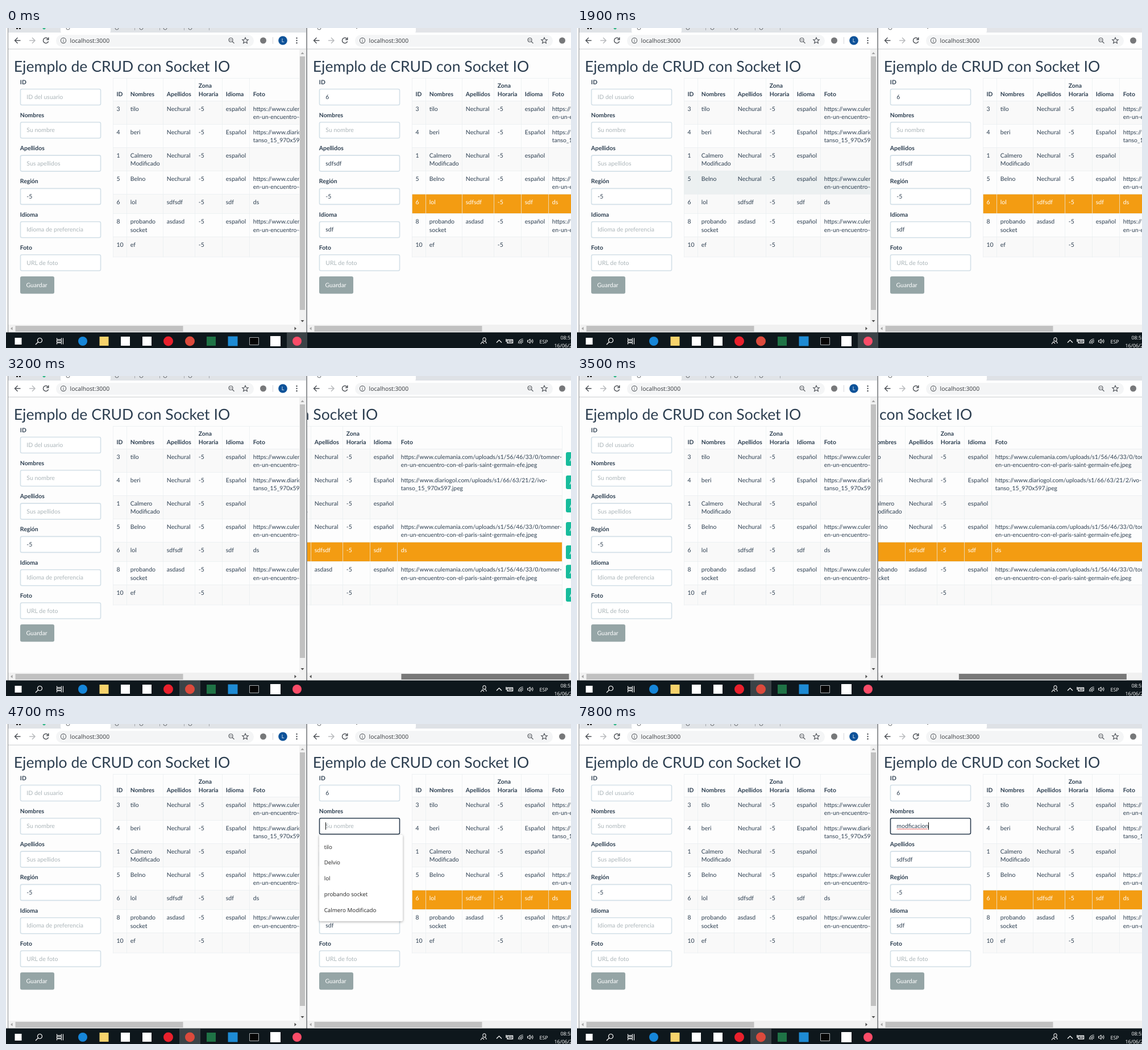
An HTML page with a canvas for the animation above (8 s loop, 994x563 px).

```html
<!DOCTYPE html>
<html lang="es">
<head>
<meta charset="utf-8">
<title>Ejemplo de CRUD con Socket IO</title>
<style>
html, body { margin: 0; width: 100%; height: 100%; overflow: hidden; background: #fdfdfd; }
canvas { display: block; }
</style>
</head>
<body>
<canvas id="stage" width="994" height="563"></canvas>
<script>
const ctx = document.getElementById('stage').getContext('2d');
const LOOP = 8000, STEP = 100, PANE_SHIFT = 526;
const INK = '#2c3e50', PAGE = '#fdfdfd', LINE = '#e9eef0';
const LATO = 'Lato, sans-serif', UI = '"Open Sans", sans-serif';
const BODY = `10.5px ${LATO}`, BOLD = `bold 10.4px ${LATO}`, TITLE = `26.6px ${LATO}`;

const longUrl = ['https://www.culemania.com/uploads/s1/56/46/33/0/tomner-', 'en-un-encuentro-con-el-paris-saint-germain-efe.jpeg'];
const otherUrl = ['https://www.diariogol.com/uploads/s1/66/63/21/2/ivo-', 'tanso_15_970x597.jpeg'];
const columns = [188, 212.3, 276.3, 332.3, 380.3, 428.3, 718.3];
const headers = ['ID', 'Nombres', 'Apellidos', 'Zona|Horaria', 'Idioma', 'Foto'];
const rowTops = [128, 169, 210, 251, 292, 326.3, 367, 402.5];
const rows = [
  ['3', 'tilo', 'Nechural', '-5', 'español', longUrl],
  ['4', 'beri', 'Nechural', '-5', 'Español', otherUrl],
  ['1', 'Calmero|Modificado', 'Nechural', '-5', 'español', ''],
  ['5', 'Belno', 'Nechural', '-5', 'español', longUrl],
  ['6', 'lol', 'sdfsdf', '-5', 'sdf', 'ds'],
  ['8', 'probando|socket', 'asdasd', '-5', 'español', longUrl],
  ['10', 'ef', '', '-5', '', '']
];
const SELECTED = 4;
const fields = [
  ['ID', 'ID del usuario'], ['Nombres', 'Su nombre'], ['Apellidos', 'Sus apellidos'],
  ['Región', ''], ['Idioma', 'Idioma de preferencia'], ['Foto', 'URL de foto']
];
const suggestions = ['tilo', 'Delvio', 'lol', 'probando socket', 'Calmero Modificado'];

// [time, value] lists: the last entry already reached is in force
const at = (track, t) => track.reduce((value, [time, next]) => t >= time ? next : value, track[0][1]);
const leftHover = [[0, -1], [600, 5], [700, 1], [800, -1], [1900, 3], [2000, -1]];
const rightHover = [[0, -1], [4200, 5], [4300, -1]];
const scrollTrack = [[0, 0], [2700, 16], [2800, 62], [2900, 115], [3000, 170], [3100, 222],
  [3200, 266], [3300, 296], [3500, 225], [3600, 125], [3700, 40], [3800, 0]];
const thumbTrack = [[0, '#c1c1c1'], [2300, '#a8a8a8'], [2700, '#787878'], [4000, '#c1c1c1']];
const borderTrack = [[0, '#d3e0e8'], [2700, '#8f9dab'], [2800, '#56657a'], [2900, INK]];
const caretTrack = [[0, false], [2700, true], [3200, false], [3700, true], [4200, false], [4700, true],
  [5200, false], [5500, true], [7300, false], [7800, true]];
const typedTrack = [[0, 0], [5500, 1], [5700, 3], [5900, 5], [6100, 6], [6200, 7], [6300, 8],
  [6500, 9], [6700, 10], [6800, 11]];

function rect(x, y, w, h, color) {
  ctx.fillStyle = color;
  ctx.fillRect(x, y, w, h);
}
function rounded(x, y, w, h, r, fill, stroke, width = 1) {
  ctx.beginPath();
  ctx.roundRect(x, y, w, h, r);
  if (fill) { ctx.fillStyle = fill; ctx.fill(); }
  if (stroke) { ctx.strokeStyle = stroke; ctx.lineWidth = width; ctx.stroke(); }
}
function disc(x, y, r, color) {
  ctx.beginPath();
  ctx.arc(x, y, r, 0, 7);
  ctx.fillStyle = color;
  ctx.fill();
}
function path(d, x, y, color, width = 1.3) {
  ctx.save();
  ctx.translate(x, y);
  ctx.strokeStyle = color;
  ctx.lineWidth = width;
  ctx.stroke(new Path2D(d));
  ctx.restore();
}
function triangle(x, y, dx, dy, color) {
  ctx.beginPath();
  ctx.moveTo(x + dx * 2, y + dy * 2);
  ctx.lineTo(x - dx * 1.5 + dy * 3, y - dy * 1.5 + dx * 3);
  ctx.lineTo(x - dx * 1.5 - dy * 3, y - dy * 1.5 - dx * 3);
  ctx.fillStyle = color;
  ctx.fill();
}
function text(value, x, y, color = INK, font = BODY) {
  ctx.font = font;
  ctx.fillStyle = color;
  ctx.fillText(value, x, y);
}
function clipped(x, y, w, h, draw) {
  ctx.save();
  ctx.beginPath();
  ctx.rect(x, y, w, h);
  ctx.clip();
  draw();
  ctx.restore();
}

function drawTable(selected, hovered) {
  const [left, right] = [columns[0], columns.at(-1)];
  const bottom = rowTops.at(-1), hairline = 0.73, pad = 6.5;
  rows.forEach((row, i) => {
    const top = rowTops[i], active = i === selected;
    const fill = active ? '#f39c12' : i === hovered ? '#ecf0f1' : i % 2 ? PAGE : '#f9f9f9';
    rect(left, top, right - left, rowTops[i + 1] - top, fill);
  });
  for (const y of [88, ...rowTops]) rect(left, y, right - left, hairline, LINE);
  for (const x of columns) rect(x, 88, hairline, bottom - 87, LINE);
  headers.forEach((header, c) => {
    const lines = header.split('|');
    lines.forEach((line, n) => text(line, columns[c] + pad, 119.5 - 14.7 * (lines.length - 1 - n), INK, BOLD));
  });
  rows.forEach((row, i) => {
    row.forEach((cell, c) => {
      const isUrl = Array.isArray(cell);
      const lines = isUrl ? cell : cell.split('|');
      lines.forEach((line, n) => text(line, columns[c] + pad, rowTops[i] + 17.5 + n * 14.7,
        i === selected ? '#fff' : INK, isUrl ? `10.35px ${LATO}` : BODY));
    });
    rounded(725, rowTops[i] + 6, 64, 24, 3, '#18bc9c');
    text('Actualizar', 731.5, rowTops[i] + 21.5, '#fff');
  });
}

function drawForm(values, focusBorder) {
  fields.forEach(([label, placeholder], i) => {
    const y = 58.3 * i;
    text(label, 24.8, 98.5 + y, INK, BOLD);
    rounded(25.5, 107.5 + y, 141, 28, 2.5, '#fff', i === 1 ? focusBorder : borderTrack[0][1], 1.6);
    const value = values[i];
    text(value || placeholder, 36.3, 125 + y, value ? INK : '#acb6ba');
  });
  rounded(25, 437, 60, 30.5, 3, '#95a5a6');
  text('Guardar', 35.5, 456, '#fff');
}

function drawEditing(typed, t) {
  ctx.font = BODY;
  const end = 36.3 + ctx.measureText(typed).width;
  if (at(caretTrack, t)) rect(Math.round(end), 173, 1, 13, '#111');
  if (t >= 7700) {
    let wave = 'M0 0';
    for (let x = 1.5, up = true; x < end - 37; x += 1.5, up = !up) wave += `L${x} ${up ? -1.6 : 0}`;
    path(wave, 36.8, 185.6, '#e8403c', 0.9);
  }
}

function drawToolbar() {
  rect(4, 8, 524, 29, '#fff');
  rect(4, 36.5, 524, 1, '#c9cbce');
  path('M5 0H-5M0 -5L-5 0L0 5', 20.5, 22, '#50545a', 1.5);
  path('M-5 0H5M0 -5L5 0L0 5', 46, 22, '#b9bbbe', 1.5);
  path('M4 -2.8A4.7 4.7 0 1 0 4.6 1.5M4.8 -5.4V-1.5H1', 70, 22, '#50545a', 1.5);
  rounded(88, 12, 348, 21, 10.5, '#f4f5f6');
  path('M-4.6 0A4.6 4.6 0 1 1 4.6 0A4.6 4.6 0 1 1 -4.6 0M0 -.6V2.6M0 -2.6V-1.4', 101, 22, '#5f6368', 1.1);
  text('localhost:3000', 112.6, 26, '#33363a', `10.3px ${UI}`);
  path('M-4.5 -1A3.5 3.5 0 1 1 2.5 -1A3.5 3.5 0 1 1 -4.5 -1M1.5 1.5L5 5M-3 -1H1', 396.5, 22, '#5f6368', 1.2);
  path('M0 -5.3L1.6 -1.8L5.3 -1.5L2.5 1L3.4 4.8L0 2.8L-3.4 4.8L-2.5 1L-5.3 -1.5L-1.6 -1.8Z', 421, 22, '#50545a', 1.1);
  disc(452.5, 22, 5.5, '#77787a');
  rect(469, 16, 1, 12, '#d5d7da');
  disc(487, 22, 7.8, '#0d5299');
  text('L', 484.8, 25.3, '#fff', `9px ${UI}`);
  for (const y of [17.8, 22, 26.2]) disc(511.5, y, 1.2, '#50545a');
}

function drawTabs() {
  rect(4, 0, 524, 8, '#e0e3e7');
  rounded(96, -8, 88, 17, 4, '#fff');
  rect(18, 0, 3, 2, '#222');
  rect(23, 0, 3, 2, '#222');
  disc(67, 0, 2.5, '#35b88a');
  for (const x of [109, 195, 238, 280, 324]) path('M-3 0A3 3 0 0 0 3 0', x, 0, '#666b70', 1);
  for (const x of [226, 270, 313, 357]) rect(x, 0, 1, 4, '#a5a9ae');
}

function drawScrollbars(thumbX, thumbColor, moved) {
  rect(4, 522, 524, 13.5, '#f1f1f1');
  rect(516, 38, 12, 497, '#f1f1f1');
  rect(517, 50, 9, 446, '#c1c1c1');
  rect(thumbX, 524, 295, 10, thumbColor);
  triangle(521.5, 44.5, 0, -1, '#a3a3a3');
  triangle(521.5, 515.5, 0, 1, '#505050');
  triangle(10, 528.8, -1, 0, moved ? '#505050' : '#a3a3a3');
  triangle(509, 528.8, 1, 0, '#505050');
}

function drawLeftWindow(t) {
  drawTabs();
  drawToolbar();
  clipped(4, 38, 512, 484, () => {
    text('Ejemplo de CRUD con Socket IO', 13.8, 76.5, INK, TITLE);
    drawForm(['', '', '', '-5', '', ''], borderTrack[0][1]);
    drawTable(-1, at(leftHover, t));
  });
  drawScrollbars(16.5, '#c1c1c1', false);
  rect(0, 0, 3, 536, '#fafafa');
  rect(3, 0, 1, 536, '#8d9093');
}

function drawRightWindow(t) {
  const scroll = at(scrollTrack, t);
  const typed = 'modficacion'.slice(0, at(typedTrack, t));
  const focused = t >= 2700;
  clipped(529, 0, 465, 536, () => {
    ctx.translate(PANE_SHIFT, 0);
    rect(4, 0, 524, 8, focused ? '#dee1e6' : '#e2e4e8');
    rounded(-8, -8, 203, 17, 4, '#fff');
    path('M-3 0A3 3 0 0 0 3 0', 25, 0, '#666b70', 1);
    path('M-2 -2L1 1M4 -2L1 1', 90, 0, '#777', 1);
    drawToolbar();
    clipped(4, 38, 512, 484, () => {
      ctx.translate(-scroll, 0);
      text('Ejemplo de CRUD con Socket IO', 13.8, 76.5, INK, TITLE);
      drawForm(['6', typed, 'sdfsdf', '-5', 'sdf', ''], at(borderTrack, t));
      drawTable(SELECTED, at(rightHover, t));
      if (focused) drawEditing(typed, t);
    });
    drawScrollbars(16.5 + scroll * 0.575, at(thumbTrack, t), scroll > 0);
  });
  rect(528.4, 0, 1.4, 536, '#63676b');
  if (t >= 4700 && t < 5500) drawSuggestions();
}

function drawSuggestions() {
  ctx.save();
  ctx.shadowColor = 'rgba(0,0,0,.35)';
  ctx.shadowBlur = 4;
  ctx.shadowOffsetY = 1;
  rounded(551, 195, 147, 152, 2, '#fff');
  ctx.restore();
  suggestions.forEach((name, i) => text(name, 559.7, 219.5 + 27.75 * i, '#222', `9.75px ${UI}`));
}

function drawTaskbar(t) {
  const y = 551, box = (x, color, size = 16) => rect(x - size / 2, y - size / 2, size, size, color);
  rect(0, 535.5, 994, 28, '#0e171c');
  if (t < 2700) rect(494, 536, 36, 27, '#3b4347');
  else rect(305, 536, 37, 27, '#3b4347');
  box(21.5, '#fff', 12);
  path('M-2.5 -1.5A4 4 0 1 1 5.5 -1.5A4 4 0 1 1 -2.5 -1.5M-1.5 1.5L-6 6', 58, y, '#fff', 1.2);
  path('M-5.5 -5.5V-3H2.5V-5.5M-5.5 5.5V3H2.5V5.5M-5.5 -1.5H2.5V1.5H-5.5ZM5.5 -5.5V5.5', 95, y, '#fff', 1.1);
  disc(135, y, 8, '#1686d9');
  box(172.5, '#f7d36c');
  box(210, '#fff');
  box(248, '#fff');
  disc(285.5, y, 8.5, '#e9202c');
  disc(323.5, y, 8.5, '#dc4a3c');
  box(361, '#1f7346');
  box(399, '#1e8bd4', 17);
  rounded(428.5, 544.5, 16, 13, 0, '#050505', '#a9adb0');
  box(474, '#fff', 18);
  disc(512, y, 8, '#fb4c68');

  path('M-1 -3A2.6 2.6 0 1 1 4 -3A2.6 2.6 0 1 1 -1 -3M-5 5L-2 1L1 4M1 0Q5 0 5 4', 840, y, '#fff', 1.1);
  path('M-4.5 2.5L0 -2L4.5 2.5', 867.5, y, '#fff', 1.2);
  path('M-4 -2.5H5.5V3H-4ZM-6 -4V1M-2 0H4', 886, y, '#fff', 1.4);
  path('M-4 4A8 8 0 0 1 4 -4M-1.5 4.5A6 6 0 0 1 4.5 -1.5M1 4.5A3.5 3.5 0 0 1 4.5 1', 905.5, y, '#e4e6e7', 1.1);
  path('M-5.5 -1.5H-3.5L-1 -4V4L-3.5 1.5H-5.5ZM1 -2Q2.3 0 1 2M3 -3.5Q5.2 0 3 3.5', 923, y, '#fff', 1);
  const small = `8.8px ${UI}`;
  text('ESP', 938.5, 554.5, '#fff', small);
  text('08:55', 975.5, 548, '#fff', small);
  text('16/06/2019', 964.5, 561.5, '#fff', small);
}

function frame() {
  const t = Math.floor(performance.now() % LOOP / STEP) * STEP;
  ctx.textRendering = 'geometricPrecision';
  rect(0, 0, 994, 563, PAGE);
  drawLeftWindow(t);
  drawRightWindow(t);
  drawTaskbar(t);
  requestAnimationFrame(frame);
}
frame();
</script>
</body>
</html>
```
